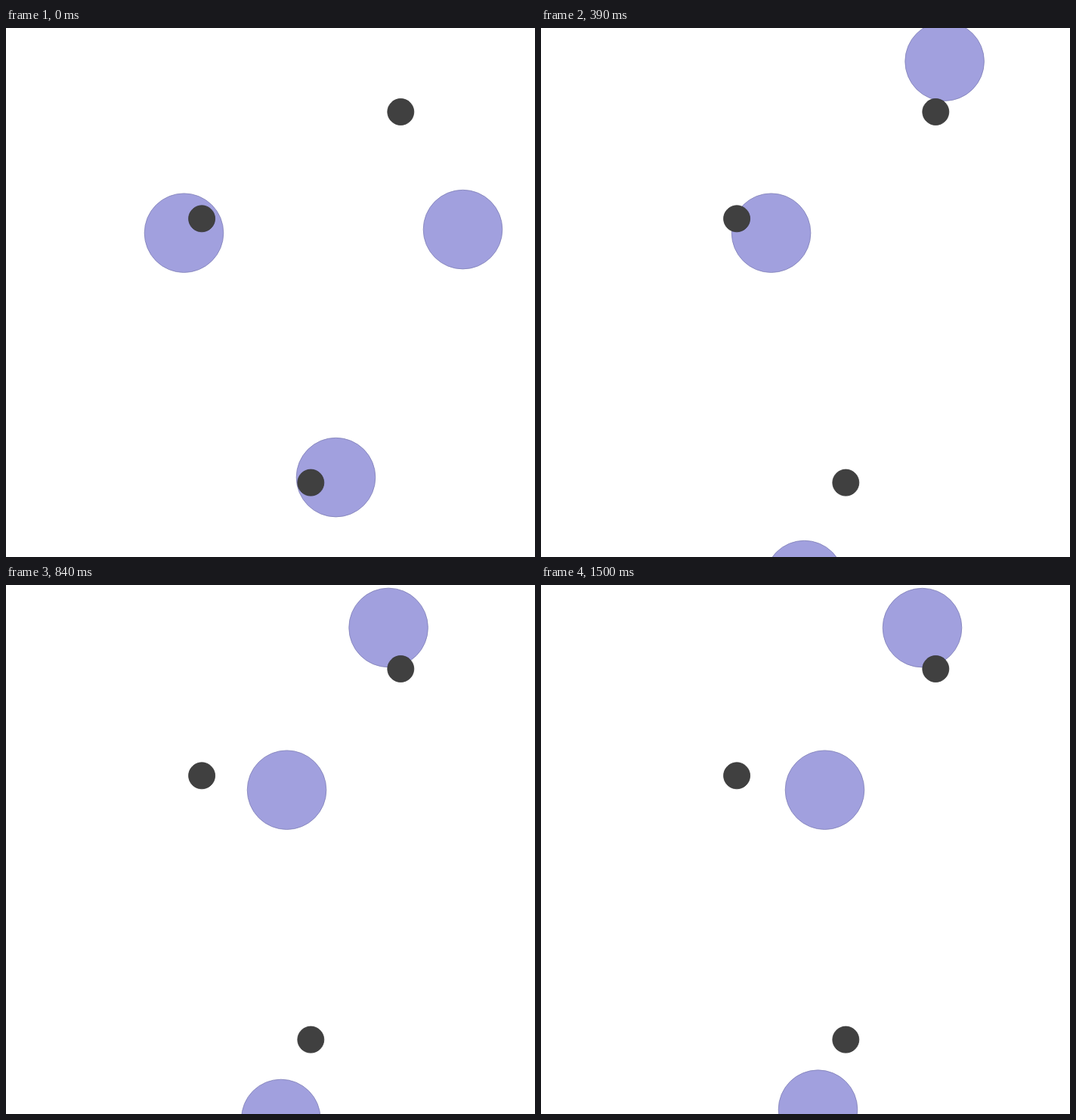
Write an HTML page that moves like this. It is 700 px wide and 700 px high and loops after 1530 ms.

```html
<!DOCTYPE html>
<html lang="en">
<head>
<meta charset="utf-8">
<title>Drifting agents</title>
<style>
  html, body { margin: 0; width: 100%; height: 100%; overflow: hidden; background: #fff; }
  svg { display: block; width: 100vw; height: 100vh; }
  .agent { fill: #a1a0de; stroke: #7f7fb6; }
  .mark { fill: #404040; stroke: #363636; }
  circle { stroke-width: .8; }
</style>
</head>
<body>
<svg viewBox="0 0 700 700"></svg>
<script>
const STEP = 30, STEPS = 51, DAMP = 0.75, REACH = 70;

// Each push is [step, amount]; drag lets it travel amount * REACH in total.
const agents = [
  { x: 235.5, y: 271.2,
    px: [[1, 1], [2, 1], [3, -1], [19, 1]],
    py: [] },
  { x: 604.5, y: 266.6, vx: -0.4336, vy: -1,
    px: [[2, -1], [4, -1], [5, 1], [11, 0.7], [19, -1.385], [20, 0.69]],
    py: [[1, -1], [6, -1], [9, -1], [12, 1]] },
  { x: 436.5, y: 594.6, vy: 0.4219,
    px: [[3, -0.667], [8, -0.752], [24, 0.6], [27, -0.181]],
    py: [[2, 1], [4, 1], [7, -0.44], [25, -0.56]] }
];
const marks = [[522.3, 111], [259.1, 252.3], [403.3, 601.6]];

const svg = document.querySelector('svg');

function circle(name, x, y, r) {
  const el = document.createElementNS(svg.namespaceURI, 'circle');
  const attrs = { class: name, cx: x, cy: y, r };
  for (const key in attrs) el.setAttribute(key, attrs[key]);
  return svg.appendChild(el);
}

const glide = n => n > 0 ? 1 - DAMP ** n : 0;

function along(start, drift = 0, pushes, n) {
  const sum = pushes.reduce((s, [at, a]) => s + a * glide(n - at + 1), drift * glide(n));
  return start + REACH * sum;
}

for (const a of agents) a.el = circle('agent', a.x, a.y, 52.3);
for (const [x, y] of marks) circle('mark', x, y, 17.5);

const begin = performance.now();

function draw(now) {
  const n = Math.floor(Math.max(0, now - begin) / STEP) % STEPS;
  for (const a of agents) {
    a.el.setAttribute('cx', along(a.x, a.vx, a.px, n));
    a.el.setAttribute('cy', along(a.y, a.vy, a.py, n));
  }
  requestAnimationFrame(draw);
}
draw(begin);
</script>
</body>
</html>
```
